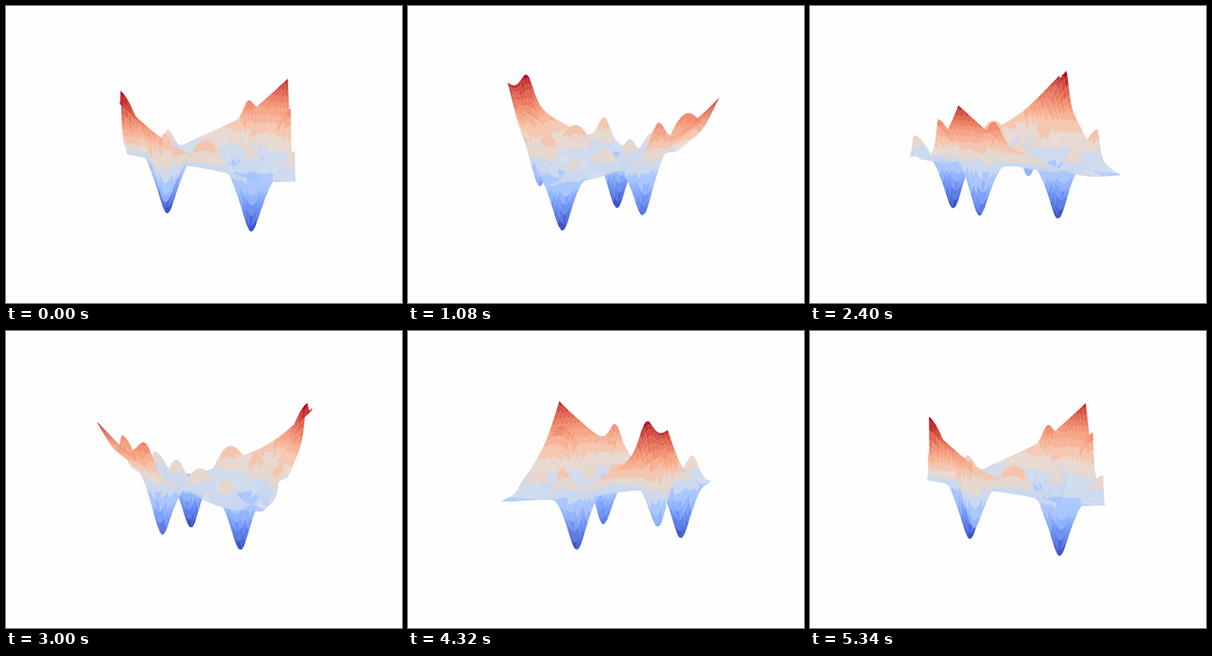
A matplotlib script that plays this animation: 640 by 480 pixels, repeating every 5.4 s.

```python
import numpy as np
import matplotlib.pyplot as plt
from matplotlib.animation import FuncAnimation
from matplotlib.collections import PolyCollection
from matplotlib.colors import ListedColormap

W, H = 640, 480
FRAMES, INTERVAL = 90, 60
CELLS, STRIDE = 50, 6                    # cells per side, samples per cell edge
ELEV = np.radians(10)
DIST = 10
SCALE = H / 0.185                        # pixels per projected unit
CX, CY = 80 + H * 95 / 185, H * 95 / 185
SIDE, HEIGHT = 8 / 7 / 1.1, 6 / 7        # box size in world units


def bird(x, y):
    """Bird test function for optimisers."""
    return (np.sin(x) * np.exp((1 - np.cos(y)) ** 2)
            + np.cos(y) * np.exp((1 - np.sin(x)) ** 2)
            + (x - y) ** 2)


def stepped_coolwarm():
    """Coolwarm in flat steps, wide in the pale middle and fine at the ends."""
    blues = np.linspace(0.6, 8.4, 6)
    pale = [10.6, 14, 17.3, 20]
    reds = np.linspace(22, 32, 8)
    levels = np.concatenate([blues, pale, reds]) / 32
    t = np.linspace(0, 1, 256)
    nearest = np.abs(t[:, None] - levels).argmin(axis=1)
    return ListedColormap(plt.get_cmap("coolwarm")(levels[nearest]))


def patches(grid):
    """Outline samples of every surface cell, one row per cell."""
    s = STRIDE
    start = np.arange(0, CELLS * s, s)
    i, j = np.meshgrid(start, start)
    ring = ([(0, k) for k in range(s)] + [(k, s) for k in range(s)]
            + [(s, s - k) for k in range(s)] + [(s - k, 0) for k in range(s)])
    return np.stack([grid[i + a, j + b].ravel() for a, b in ring], axis=1)


axis = np.linspace(-2 * np.pi, 2 * np.pi, CELLS * STRIDE + 1)
X, Y = np.meshgrid(axis, axis)
Z = bird(X, Y)

px = patches(X) / (4 * np.pi) * SIDE
py = patches(Y) / (4 * np.pi) * SIDE
pz = ((patches(Z) - Z.min()) / (Z.max() - Z.min()) - 0.5) * HEIGHT

shade = pz.mean(axis=1)
shade = (shade - shade.min()) / (shade.max() - shade.min())
colors = stepped_coolwarm()(shade)

fig = plt.figure(figsize=(W / 100, H / 100), dpi=100, facecolor="#fefefe")
ax = fig.add_axes([0, 0, 1, 1])
ax.set_xlim(0, W)
ax.set_ylim(0, H)
ax.axis("off")
surface = PolyCollection([], linewidths=0, edgecolors="none", antialiaseds=True)
ax.add_collection(surface, autolim=False)


def update(frame):
    azim = np.radians(frame * 360 / FRAMES)
    right = py * np.cos(azim) - px * np.sin(azim)
    near = px * np.cos(azim) + py * np.sin(azim)
    up = pz * np.cos(ELEV) - near * np.sin(ELEV)
    depth = DIST - near * np.cos(ELEV) - pz * np.sin(ELEV)

    verts = np.stack([CX + SCALE * right / depth,
                      CY + SCALE * up / depth], axis=-1)
    order = np.argsort(-depth.mean(axis=1))
    surface.set_verts(verts[order])
    surface.set_facecolor(colors[order])
    return [surface]


anim = FuncAnimation(fig, update, frames=FRAMES, interval=INTERVAL,
                     repeat=True, repeat_delay=0)
plt.show()
```
